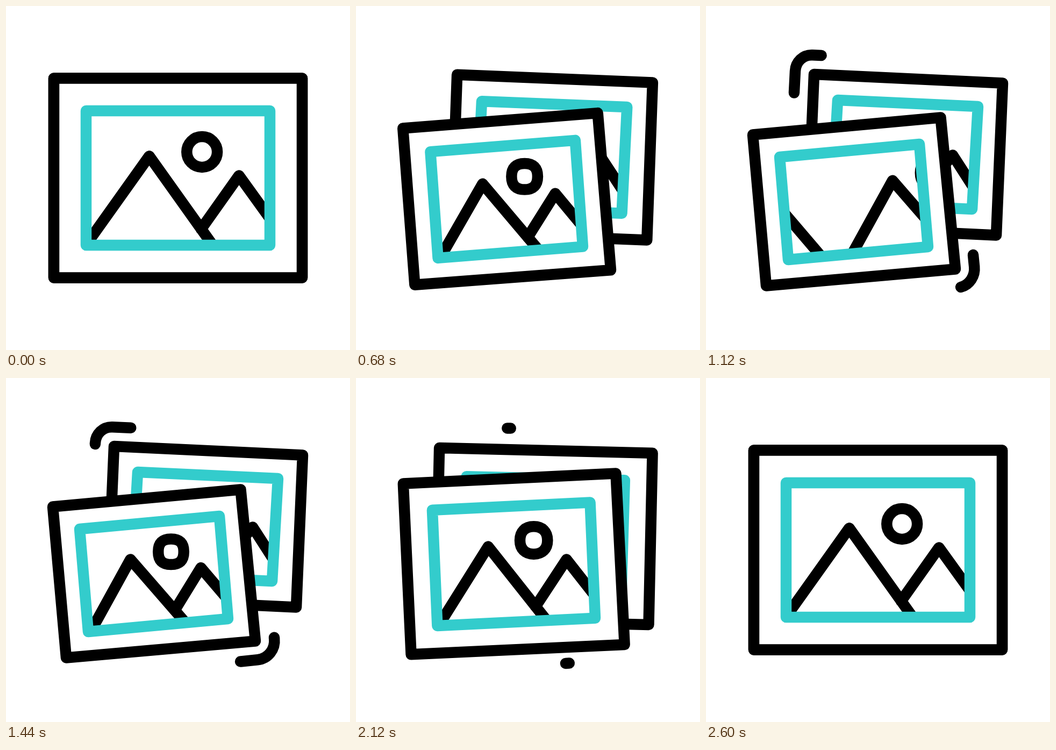
Write an HTML page with a canvas that moves like this. It is 640 px wide and 640 px high and loops after 2800 ms.

```html
<!DOCTYPE html>
<html lang="en">
<head>
<meta charset="utf-8">
<title>Gallery</title>
<style>
  html, body { margin: 0; height: 100%; overflow: hidden; background: #fff; }
  canvas { display: block; }
</style>
</head>
<body>
<canvas id="stage" width="640" height="640"></canvas>
<script>
const ctx = document.getElementById('stage').getContext('2d');
const LOOP = 2800, STEP = 40;
const BLACK = '#000', TEAL = '#33cccc';
const SLIDE = 339, SLIDE_SLOPE = -0.11;

// Poses: point lists as x, y pairs; sun as centre, radius, roundness
const rest = {
  outer: [89, 134.5, 551, 134.5, 551, 505.5, 89, 505.5],
  inner: [149, 195, 491, 195, 491, 445, 149, 445],
  big: [137, 461, 266.5, 279.25, 396, 461],
  small: [363, 415, 433.5, 315.5, 545, 470],
  sun: [364.7, 271.5, 28.4, 0.552]
};
const frontPose = {
  outer: [87, 239.5, 436.5, 207.5, 464, 489.5, 112, 520.5],
  inner: [137, 281, 397, 257, 413, 448, 153, 472],
  big: [153, 480, 231.5, 337.5, 345, 468],
  small: [314, 432, 362.5, 353, 449.5, 455],
  sun: [307, 323.2, 23.75, 0.68]
};
const backPose = {
  outer: [201, 127, 552, 143.5, 540, 426.5, 189, 410],
  inner: [245, 175, 506, 187, 495, 378, 234, 366],
  big: [222, 384, 330, 252, 405, 392],
  small: [398, 350, 459, 277.5, 523, 377],
  sun: [398, 244, 23.75, 0.68]
};

// Accent strokes: [start, end] lengths along a path, growing in and sliding out
const accents = [
  { path: new Path2D('M162 200L166 121C166.8 104 180.5 90.4 198 91.2L233 92.8L300 93.7'),
    tail: 77, head: 162, exit: 222, headEnd: 1213 },
  { path: new Path2D('M495 443L499.2 485C501.2 504.5 488 522 468 524.2L437 527.5L380 531.8'),
    tail: 40, head: 130, exit: 180, headEnd: 1322 }
];

const mix = (a, b, p) => a + (b - a) * p;
const span = (t, from, to) => Math.min(1, Math.max(0, (t - from) / (to - from)));
const smooth = u => u * u * (3 - 2 * u);

// cubic-bezier(x1, 0, x2, 1)
function ease(u, x1, x2) {
  let lo = 0, hi = 1;
  for (let i = 0; i < 24; i++) {
    const s = (lo + hi) / 2, r = 1 - s;
    if (3 * x1 * s * r * r + 3 * x2 * s * s * r + s * s * s < u) lo = s;
    else hi = s;
  }
  return smooth(lo);
}

function blend(a, b, p) {
  const pose = {};
  for (const key in a) pose[key] = a[key].map((v, i) => mix(v, b[key][i], p));
  return pose;
}

function trace(points, closed) {
  ctx.beginPath();
  for (let i = 0; i < points.length; i += 2) ctx.lineTo(points[i], points[i + 1]);
  if (closed) ctx.closePath();
}

function drawSun([x, y, r, k]) {
  ctx.save();
  ctx.translate(x, y);
  ctx.beginPath();
  ctx.moveTo(r, 0);
  for (let i = 0; i < 4; i++) {
    ctx.bezierCurveTo(r, r * k, r * k, r, 0, r);
    ctx.rotate(Math.PI / 2);
  }
  ctx.stroke();
  ctx.restore();
}

function drawScene(pose, shift) {
  ctx.save();
  ctx.translate(shift, shift * SLIDE_SLOPE);
  trace(pose.big);
  ctx.stroke();
  trace(pose.small);
  ctx.stroke();
  drawSun(pose.sun);
  ctx.restore();
}

function drawPicture(pose, slide) {
  ctx.strokeStyle = BLACK;
  trace(pose.outer, true);
  ctx.fill();
  ctx.stroke();

  ctx.save();
  trace(pose.inner, true);
  ctx.clip();
  drawScene(pose, -SLIDE * slide);
  if (slide > 0) drawScene(pose, SLIDE * (1 - slide));
  ctx.restore();

  ctx.strokeStyle = TEAL;
  trace(pose.inner, true);
  ctx.stroke();
}

function drawAccent({ path, tail, head, exit, headEnd }, t) {
  const out = smooth(span(t, 1800, 2185));
  const start = mix(tail * smooth(span(t, 840, 1400)), exit, out);
  const end = mix(head * smooth(span(t, 760, headEnd)), exit, out);
  if (out === 1 || end - start < 0.5) return;
  ctx.save();
  ctx.strokeStyle = BLACK;
  ctx.setLineDash([end - start, 999]);
  ctx.lineDashOffset = -start;
  ctx.stroke(path);
  ctx.restore();
}

function draw(t) {
  const spread = ease(span(t, 200, 880), 0.62, 0.38) - ease(span(t, 1760, 2600), 0.5, 0.42);
  const slide = ease(span(t, 780, 1380), 0.6, 0.4) % 1;

  ctx.fillStyle = '#fff';
  ctx.fillRect(0, 0, 640, 640);
  ctx.lineWidth = 20.5;
  ctx.lineCap = ctx.lineJoin = 'round';

  drawPicture(blend(rest, backPose, spread), 0);
  for (const accent of accents) drawAccent(accent, t);
  drawPicture(blend(rest, frontPose, spread), t < 1380 ? slide : 0);
}

const origin = performance.now();
function tick() {
  const t = (performance.now() - origin) % LOOP;
  draw(Math.floor(t / STEP) * STEP);
  requestAnimationFrame(tick);
}
tick();
</script>
</body>
</html>
```
